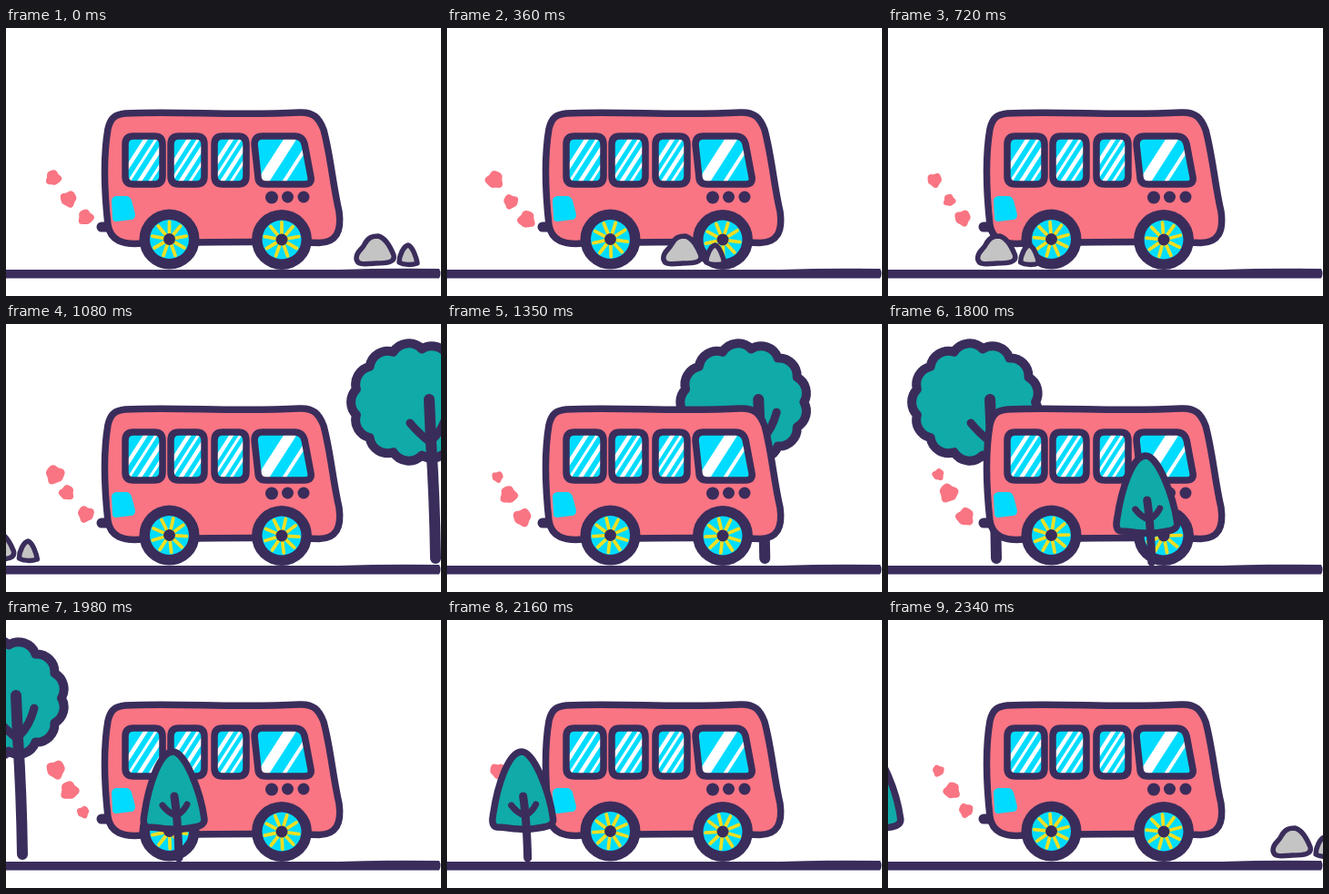
An HTML page for the animation above (2430 ms loop, 478x295 px).

```html
<!DOCTYPE html>
<html lang="en">
<head>
<meta charset="utf-8">
<title>Bus ride</title>
<style>
  html, body { margin: 0; width: 100%; height: 100%; overflow: hidden; background: #fff; }
  svg { display: block; width: 100%; height: 100%; }
  .line { stroke: #3a2d5b; stroke-linecap: round; stroke-linejoin: round; }
  .none { fill: none; }
  .navy { fill: #3a2d5b; }
  .pink { fill: #f97583; }
  .cyan { fill: #00dcff; }
  .teal { fill: #10aaa8; }
  .grey { fill: #c4c4c4; }
</style>
</head>
<body>
<svg viewBox="0 0 478 295">
  <path class="navy" d="M0 266H366Q420 264 476 265Q479 270 476 275.500H0Z"/>
  <g id="roundTree">
    <path id="crown" class="line teal" stroke-width="10"/>
    <path class="line none" stroke-width="12" d="M-6 83Q-5 105 -4 130Q0 190 1 258"/>
    <path class="line none" stroke-width="9" d="M-27 109Q-18 120 -4 131M14 97Q9 116 -2 127"/>
  </g>
  <path id="smoke" class="pink"/>

  <path class="line none" stroke-width="11" d="M105 219H112"/>
  <path class="line pink" stroke-width="7.500" d="M131 94C190 91 250 97 322 93C338 92 344 99 349 112C357 142 359 172 366 202C369 224 363 236 344 236.500C270 234 210 236 150 237C128 239 115 234 112 217C108 180 107 140 112 111C115 98 121 95 131 94Z"/>
  <path class="cyan" d="M116 190Q116 186 121 185H132Q136 185 138 190L142 205Q142 211 137 211L121 213Q117 213 117 209Z"/>
  <g id="windows"></g>
  <g class="navy">
    <circle cx="292" cy="186.500" r="7"/><circle cx="309.500" cy="186" r="6.500"/><circle cx="327" cy="186" r="6.500"/>
  </g>
  <g id="wheels"></g>

  <g id="smallTree">
    <path class="line teal" stroke-width="7.500" d="M-6 145C8 144 25 190 29 219C30 228 18 228 2 230.500C-12 231 -24 228 -33 228C-39 227 -38 219 -37 214C-32 180 -20 146 -6 145Z"/>
    <path class="line none" stroke-width="9" d="M-4 194Q0 220 1 262"/>
    <path class="line none" stroke-width="7" d="M-17 204Q-10 213 -2 215M10 203Q6 211 -1 215"/>
  </g>
  <g id="rocks" class="line grey" stroke-width="5.500">
    <path d="M384 254C384 245 390 245 393 238C397 230 402 229 408 229C416 231 421 240 425 250C427 258 418 259 405 259C392 260 385 261 384 254Z"/>
    <path d="M431 258C431 250 436 240 441 239C446 241 450 253 451 259C445 261 436 261 431 258Z"/>
  </g>
</svg>
<script>
const $ = id => document.getElementById(id);
const STEP = 90, STEPS = 27, TAU = Math.PI * 2;

function windowPane(id, left, width, slant, shines) {
  const top = 119, bottom = 172, r = 9, right = left + width;
  const low = left + slant * 0.35, lowRight = right + slant;
  const outline = `M${left + r} ${top}H${right - r}Q${right} ${top} ${right + slant * 0.2} ${top + r}
    L${lowRight - slant * 0.2} ${bottom - r}Q${lowRight} ${bottom} ${lowRight - r} ${bottom}
    H${low + r}Q${low} ${bottom} ${low} ${bottom - r}L${left} ${top + r}Q${left} ${top} ${left + r} ${top}Z`;
  const stripes = shines.map(([at, thickness]) =>
    `<path stroke="#fff" stroke-width="${thickness}" d="M${left + width * at} ${top}l-34 ${bottom - top}"/>`);
  return `<clipPath id="${id}"><path d="${outline}"/></clipPath>
    <path class="cyan" d="${outline}"/>
    <g clip-path="url(#${id})">${stripes.join("")}</g>
    <path class="line none" stroke-width="7.500" d="${outline}"/>`;
}
const hatch = [0.6, 0.88, 1.16, 1.44].map((at, i) => [at, i % 2 ? 3 : 4.5]);
$("windows").innerHTML =
  windowPane("rear", 131, 41, 0, hatch) +
  windowPane("middle", 181, 37, 0, hatch) +
  windowPane("front", 229, 35, 0, hatch) +
  windowPane("cab", 273, 53, 11, [[0.78, 12], [1.22, 4]]);

const spokes = Array.from({ length: 9 }, (_, i) =>
  `<path d="M0 -6V-19" transform="rotate(${i * 40})"/>`).join("");
const wheel = (x, y) => `
  <g transform="translate(${x} ${y})">
    <circle class="navy" r="33"/><circle class="cyan" r="21.500"/>
    <g class="spin" stroke="#eedf22" stroke-width="3.800" stroke-linecap="round">${spokes}</g>
    <circle class="navy" r="6.500"/>
  </g>`;
$("wheels").innerHTML = wheel(179.5, 232.5) + wheel(303, 233);
const spinners = document.querySelectorAll(".spin");

function scallops(cx, cy, rx, ry, count) {
  let d = "";
  for (let i = 0; i <= count; i++) {
    const a = i / count * TAU;
    d += `${i ? "A20 20 0 0 1 " : "M"}${cx + rx * Math.cos(a)} ${cy + ry * Math.sin(a)}`;
  }
  return d + "Z";
}
$("crown").setAttribute("d", scallops(-22, 86, 66, 59, 13));

const random = seed => {
  const n = Math.sin(seed * 12.9898) * 43758.5453;
  return n - Math.floor(n);
};

function blob(x, y, r, seed) {
  let d = "";
  for (let a = 0; a < TAU; a += TAU / 24) {
    const k = r * (1 + 0.1 * Math.sin(3 * a + seed) + 0.07 * Math.sin(5 * a + seed * 2));
    d += `${a ? "L" : "M"}${x + k * Math.cos(a)} ${y + k * Math.sin(a)}`;
  }
  return d + "Z";
}

// Three puffs rise from the exhaust and flicker around their spots
function smoke(step) {
  return [0, 1, 2].map(i => {
    const seed = step * 9 + i * 3 + 1;
    const jitter = k => (random(seed + k) - 0.5) * 6;
    return blob(85 - 15.5 * i + jitter(0), 211 - 22.5 * i + jitter(1), 8 + jitter(2) * 0.8, seed);
  }).join("");
}

// Scenery passes x at step `at`, with a speed per step and a slight change of speed
function scroll(id, step, at, x, speed, gain) {
  const lead = 4;
  const n = (step - at + lead + STEPS) % STEPS - lead;
  $(id).setAttribute("transform", `translate(${x - speed * n - gain * n * n} 0)`);
}

function draw(now) {
  const step = Math.floor(now / STEP) % STEPS;
  scroll("rocks", step, 0, 1, 37.8, -0.25);
  scroll("roundTree", step, 12, 471, 39, 0.64);
  scroll("smallTree", step, 18, 387, 48.75, 0.19);
  spinners.forEach(s => s.setAttribute("transform", `rotate(${step / STEPS * 120})`));
  $("smoke").setAttribute("d", smoke(step));
  requestAnimationFrame(draw);
}
draw(performance.now());
</script>
</body>
</html>
```
